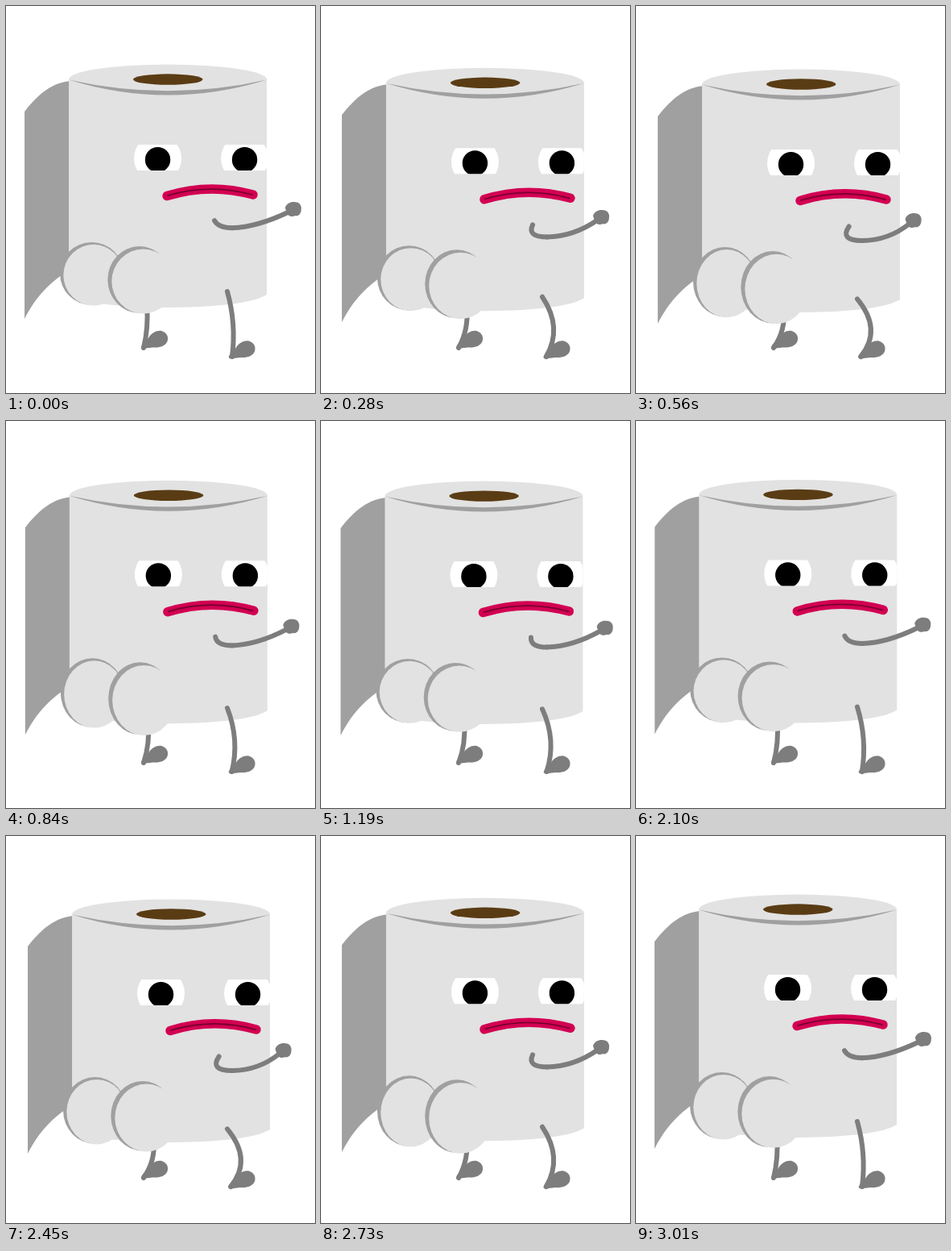
An HTML page without scripts for the animation above (3.08 s loop, 384 by 480 pixels).

```html
<!DOCTYPE html>
<html lang="en">
<head>
<meta charset="utf-8">
<title>Walking paper roll</title>
<style>
@property --f { syntax: "<number>"; inherits: true; initial-value: 0; }
@property --k { syntax: "<number>"; inherits: true; initial-value: 0; }
@property --j { syntax: "<number>"; inherits: true; initial-value: 0; }
@property --rest { syntax: "<number>"; inherits: true; initial-value: 0; }

html, body { margin: 0; width: 100%; height: 100%; overflow: hidden; background: #fff; }
svg { display: block; width: 384px; height: 480px; animation: tick 3080ms steps(44) infinite; }
@keyframes tick { from { --f: 0; } to { --f: 44; } }

/* k: body dip 0..1, j: lagging jiggle -1..1, rest: settled start */
.roll {
  --k: calc(.5 - .5 * cos((var(--f) + .5) * 24.54545deg));
  --j: calc(cos((var(--f) - 1.2) * 24.54545deg));
  --rest: calc(max(0, 1 - var(--f) / 3));
}

.bob { transform: translate(calc(4.3px * var(--k)), calc(6.4px * var(--k))); }
.cheek { transform-origin: 0 0; }
.left {
  transform: translateY(293px)
    scaleY(calc((87 - 6 * var(--k) - 6 * var(--j) - 3.2 * var(--rest)) / 80));
}
.right {
  transform: translateY(298px)
    scaleY(calc((91.5 - 6 * var(--k) - 4.5 * var(--j) - 4 * var(--rest)) / 84));
}

/* each limb piece is a unit curve mapped onto its three moving points */
.limb {
  fill: none; stroke: #7d7d7d; stroke-width: 6; stroke-linecap: round;
  vector-effect: non-scaling-stroke; transform-origin: 0 0;
}
.leg-front { transform: matrix(calc(11 + 22 * var(--k)), calc(40 - 2 * var(--k)), calc(-5 - 24 * var(--k)), calc(41 - 8 * var(--k)), 275, calc(354 + 10 * var(--k))); }
.leg-back { transform: matrix(calc(2 + var(--k)), calc(30 - 4 * var(--k)), calc(-6 - 10 * var(--k)), calc(24 - 2 * var(--k)), calc(175 + 9 * var(--k)), calc(370 + 6 * var(--k))); }
.upper-arm { transform: matrix(calc(5 - 18 * var(--k)), calc(9 + 9 * var(--k)), calc(17 + 12 * var(--k)), 0, calc(259 + 6 * var(--k)), calc(266 + 8 * var(--k))); }
.forearm { transform: matrix(calc(31 + 2 * var(--k)), calc(var(--k) - 1), calc(40 - 15 * var(--k)), calc(-19 - 2 * var(--k)), 281, calc(275 + 17 * var(--k))); }
.hand { transform: translate(calc(357px - 13.3px * var(--k)), calc(252px + 15.2px * var(--k))); }

.skin { fill: #7d7d7d; }
.paper { fill: #e2e2e2; }
.shade { fill: #a0a0a0; }
.mouth { fill: none; stroke-linecap: round; }
</style>
</head>
<body>
<svg viewBox="0 0 384 480">
  <defs>
    <path id="foot" d="M0 20C1 17 6 14 9 9C13 3 19 0 25 1C31 3 34 8 32 14C30 19 24 21.500 17 21.500C12 21.500 8 22 4 23C1 23 -1 22 0 20Z"/>
    <clipPath id="lids"><rect x="150" y="172" width="174" height="32"/></clipPath>
    <g id="eye">
      <circle r="29.5" cy="-1" fill="#fff"/>
      <circle r="15.7" cy=".6" fill="#000"/>
    </g>
  </defs>

  <g class="roll">
    <g class="bob">
      <path class="shade" d="M82 93C58 94 40 109 23 131V388C37 361 53 343 82 325Z"/>
    </g>

    <path class="limb leg-back" d="M0 0Q1 0 1 1"/>
    <use href="#foot" class="skin" x="168.5" y="402"/>

    <g class="bob">
      <path class="paper" d="M78 91A123 18.5 0 0 1 324 91V358Q300 373 201 374Q102 373 78 358Z"/>
      <path class="shade" d="M78 91.500Q201 129.500 324 91.500Q201 119 78 91.500Z"/>
      <ellipse cx="201.2" cy="91" rx="43.3" ry="6.7" fill="#5a3c14"/>

      <g clip-path="url(#lids)">
        <use href="#eye" x="188.5" y="190"/>
        <use href="#eye" x="296.5" y="190"/>
      </g>

      <path class="mouth" d="M200 235.5Q253 219 307 234" stroke="#d30052" stroke-width="11.5"/>
      <path class="mouth" d="M201 235Q253 219.500 306 234" stroke="#7a0030" stroke-width="1.8"/>

      <g class="cheek left">
        <ellipse class="shade" cx="106.5" cy="39.700" rx="39.5" ry="39.700"/>
        <ellipse class="paper" cx="108.7" cy="41.400" rx="37.4" ry="38.600"/>
      </g>
      <g class="cheek right">
        <ellipse class="shade" cx="165.8" cy="41.600" rx="39.5" ry="41.600"/>
        <ellipse class="paper" cx="170.5" cy="43.700" rx="39.2" ry="40.300"/>
      </g>
    </g>

    <path class="limb leg-front" d="M0 0Q1 0 1 1"/>
    <use href="#foot" class="skin" x="277" y="414.5"/>

    <path class="limb upper-arm" d="M0 0Q1 0 1 1"/>
    <path class="limb forearm" d="M0 0Q1 0 1 1"/>
    <path class="skin hand" d="M-10 -2C-8 -8 -2 -10 3 -9C8 -9 11 -4 10 0C10 5 7 9 2 8C-2 10 -7 8 -8 4Z"/>
  </g>
</svg>
</body>
</html>
```
